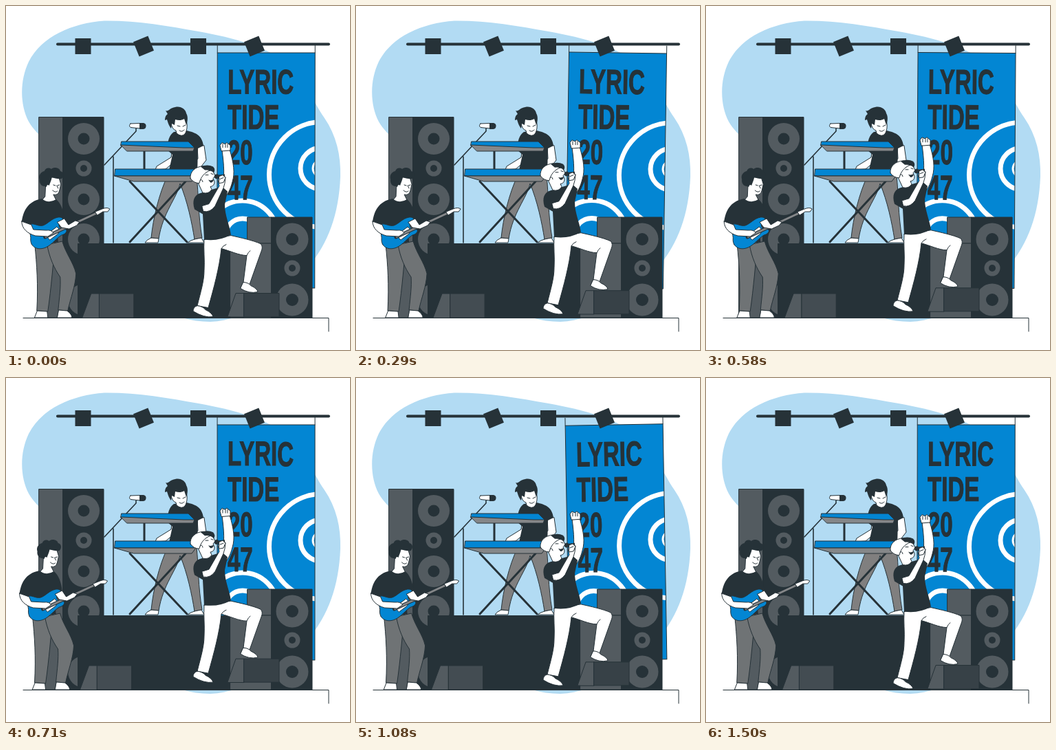
An HTML page that plays this animation: 500 by 500 pixels, repeating every 1.54 s.

```html
<!DOCTYPE html>
<html lang="en">
<head>
<meta charset="utf-8">
<title>Stage</title>
<style>
  html, body { margin: 0; width: 100%; height: 100%; overflow: hidden; background: #fff; }
  svg { display: block; width: 100vw; height: 100vh; }
  .dark { fill: #263238; }
  .blue { fill: #0386d3; }
  .ink { stroke: #263238; stroke-width: 1; stroke-linejoin: round; stroke-linecap: round; }
  .skin { fill: #fff; }
  .line { fill: none; }
  .side { fill: #535b60; }
  .ring { fill: none; stroke: #fff; stroke-width: 7; }
  .title {
    font: bold 50px "Liberation Sans", Arial, sans-serif;
    fill: #263238; stroke: #263238; stroke-width: 1;
    vector-effect: non-scaling-stroke;
  }
  #banner { transform-origin: 378px 238px; }
</style>
</head>
<body>
<svg viewBox="0 0 500 500">
  <defs>
    <clipPath id="cloth"><path d="M307 68H449V410H307Z"/></clipPath>
  </defs>

  <path fill="#b2dbf3" d="M143 21.500C190 21 235 29 280 37C330 46 385 60 413 88C434 108 446 138 463 163C480 188 487 217 486 248C484 302 468 346 440 378C404 417 352 457 297 459C239 459 195 425 156 380C124 340 107 278 88 232C75 206 45 190 33 168C20 143 20 108 33 81C52 44 96 25 143 21.500Z"/>

  <g id="banner">
    <path class="ink line" d="M307 57V68M449 57V68"/>
    <path class="blue" d="M307 68H449V410H307Z"/>
    <g clip-path="url(#cloth)" class="ring">
      <circle cx="459" cy="245" r="76.500"/>
      <circle cx="458" cy="236" r="30"/>
      <circle cx="458" cy="236" r="12" stroke-width="3"/>
      <circle cx="344" cy="334" r="51"/>
      <circle cx="344" cy="334" r="25"/>
    </g>
    <path class="ink line" d="M307 68H449V410H307Z"/>
    <g id="poster" transform="translate(322 0) scale(.66 1)"></g>
  </g>

  <path d="M75 55.5H469" stroke="#263238" stroke-width="4" stroke-linecap="round"/>
  <g id="lamps" class="dark"></g>

  <g id="leftStack">
    <path class="side ink" d="M48 161.500H83V453H48Z"/>
    <path class="dark ink" d="M83 161.500H142V453H83Z"/>
  </g>
  <g id="rightStack">
    <path class="side ink" d="M351 307H386V345H351Z"/>
    <path class="side ink" d="M326 345H386V453H326Z"/>
    <path class="dark ink" d="M386 307H445V453H386Z"/>
  </g>

  <g id="keys">
    <path class="ink line" style="stroke-width:1.6" d="M156 219V344M143 231L189 182V178"/>
    <path class="skin ink" d="M181 171L195 170.500V178L181 176.500Q178 174 181 171Z"/>
    <path class="dark" d="M194 170H200Q204 171 203.500 175Q203 179 199 179H194Z"/>
    <path fill="#807f7f" class="ink" d="M235 246L277 246C280 275 279 302 285 337L274 339C270 314 264 285 253 258C248 280 228 300 222 338L211 337C214 308 222 274 235 246Z"/>
    <path class="skin ink" d="M211 337L222 338L221 344H202Q204 340 211 337Z"/>
    <path class="skin ink" d="M274 339L284 337L288 344H264Q267 341 274 339Z"/>
    <path class="skin ink" d="M242 207L240 220L219 233L217 238L232 237L249 223Z"/>
    <path class="skin ink" d="M278 204L279 222L267 231L269 238H280L291 224L288 203Z"/>
    <path class="dark" d="M244 183L262 181C276 184 285 188 287 203L279 207L278 246L236 243L242 216L234 209C235 196 237 188 244 183Z"/>
    <path class="skin ink" d="M242 163L261 162C264 171 264 180 260 186Q255 191 248 185L247 181Q241 179 240 170Z"/>
    <path class="dark" d="M232 152C236 154 238 148 246 147C254 145 261 150 262 156C265 161 264 168 262 173L259 164C254 167 250 166 246 165L245 173L241 171L240 178C236 173 235 168 234 165L231 166C231 161 233 158 235 157Z"/>
    <path class="ink line" d="M249 174L253 175M257 175L261 173M252 181Q256 184 259 180"/>
    <path class="ink line" style="stroke-width:3" d="M180 255L263 343M261 255L180 343M201 211V237M246 211V237"/>
    <path class="blue ink" d="M168 197H265L274 206L272 211L167 203Z"/>
    <path fill="#858789" class="ink" d="M167 202L258 206L274 206L272 211H176Z"/>
    <path class="blue ink" d="M159 237H275L278 247H158Z"/>
    <path fill="#858789" class="ink" d="M158 247H276L270 255H186Z"/>
  </g>

  <path class="dark" d="M104 345H326V453H104Z"/>
  <path class="ink line" d="M25 453.500H469V473"/>

  <g id="left">
    <path class="side ink" d="M111 453L124 418H136V453Z"/>
    <path fill="#434c52" class="ink" d="M136 418H186V453H136Z"/>
    <path class="ink" fill="#6f7375" d="M42 347L72 343C69 370 66 410 61 444L45 443C47 405 45 375 42 347Z"/>
    <path class="ink" fill="#6f7375" d="M60 347L82 342C87 360 98 372 102 389C101 408 94 424 90 443L76 442C78 422 80 408 79 394C70 381 63 365 60 347Z"/>
    <path class="skin ink" d="M46 443L60 444L61 453H42Z"/>
    <path class="skin ink" d="M77 442L89 443Q96 448 96 453H75Z"/>
    <path class="skin ink" d="M58 257L57 277L51 284Q62 290 73 282L69 274Q76 276 78 268L80 259L77 249H62Z"/>
    <path class="dark" d="M49 252C47 246 51 241 56 240C57 236 62 234 66 237C71 233 79 236 79 240C84 241 85 247 81 251C76 252 70 250 67 249C66 254 64 257 63 261Q60 258 59 263L56 262C52 262 48 258 49 252Z"/>
    <path class="ink line" d="M69 260L72 261M75 261L78 260M68 268Q72 272 75 269M74 261L76 265"/>
    <path class="dark" d="M52 280Q62 288 73 281C80 286 84 298 85 309L74 314L76 343L37 347L39 319L23 314C25 299 31 284 52 280Z"/>
    <path class="blue ink" d="M35 318C40 314 46 321 54 319C62 316 66 309 76 307C84 306 85 312 79 315C75 319 78 325 84 324C91 324 89 331 81 333C74 337 67 347 58 351C46 356 36 350 36 340C37 331 31 324 35 318Z"/>
    <path class="skin ink" d="M62 330L74 321Q80 325 76 331L64 340Q58 336 62 330Z"/>
    <path class="ink line" style="stroke-width:5" d="M57 336L132 301"/>
    <path fill="none" stroke="#858789" stroke-width="3" d="M57 336L132 301"/>
    <path class="skin ink" d="M130 299L140 295Q147 292 151 295L148 299L141 299L133 304Z"/>
    <path class="skin ink" d="M23 313L37 318L40 325L58 326Q67 325 69 330L61 335L43 334C32 331 23 324 23 313Z"/>
    <path class="skin ink" d="M75 314L85 309L91 318L101 312L107 314L103 319L92 324L81 322Z"/>
  </g>

  <g id="right">
    <path class="side ink" d="M322 452L334 418H346V452Z"/>
    <path fill="#374147" class="ink" d="M346 418H397V452H346Z"/>
    <path class="skin ink" d="M288 340L327 334C340 337 359 341 370 346Q374 350 371 357L354 405L345 402L350 363C339 363 325 356 313 353C310 382 302 410 294 439L278 436C283 416 288 400 288 385C289 369 287 354 288 340Z"/>
    <path class="ink line" d="M313 353Q315 349 320 347M350 363Q352 358 355 356"/>
    <path class="skin ink" d="M278 436Q286 437 290 442Q299 446 301 452Q288 454 272 444Q272 438 278 436Z"/>
    <path class="skin ink" d="M345 402Q352 402 356 407Q365 411 366 416Q353 419 341 411Z"/>
    <path class="skin ink" d="M304 270L314 263C318 249 317 232 314 210L325 209C331 229 333 243 329 256C326 268 322 275 315 282Z"/>
    <path class="skin ink" d="M313 211L311 203L314 199L318 201L321 199L326 203V210Z"/>
    <path class="ink line" d="M315 201V206M319 201V206M322 201V206"/>
    <path class="dark" d="M281 273L297 268L314 263L322 270L318 289C318 305 325 319 327 333Q309 343 288 340L286 303L274 296C270 283 274 276 281 273Z"/>
    <path class="skin ink" d="M279 257L286 272Q295 274 299 267L297 263Q303 262 303 256L301 251L304 247L300 239L286 241Z"/>
    <path class="skin ink" d="M268 251C267 241 275 234 287 233L297 239C288 243 283 249 281 258Q273 258 268 251Z"/>
    <path class="dark" d="M283 234Q293 230 301 234Q305 238 302 243Q297 238 289 239Z"/>
    <path class="dark" d="M294 253Q298 255 302 252Q301 258 297 257Z"/>
    <path class="ink line" d="M290 246L294 246M298 244L301 245M282 254Q285 251 286 256"/>
    <path class="skin ink" d="M285 291L295 288L310 262L308 253L313 248L319 249L318 258L316 265L304 291Q297 301 287 299Z"/>
    <path class="dark" d="M303 247Q306 243 309 246L318 245V250L309 251Q305 253 303 250Z"/>
    <path class="skin ink" d="M310 248L315 246L319 250L316 257L310 258Z"/>
    <path class="ink line" d="M311 252L316 250"/>
  </g>
</svg>

<script>
const NS = "http://www.w3.org/2000/svg";
const FPS = 24, FRAMES = 37, LOOP = 1540;
const CYCLE = 36, LEAD = 0.75; // in frames
const byId = id => document.getElementById(id);

function add(parent, tag, attrs, text = "") {
  const el = document.createElementNS(NS, tag);
  for (const key in attrs) el.setAttribute(key, attrs[key]);
  el.textContent = text;
  byId(parent).append(el);
}

function cones(parent, x, list) {
  for (const [y, r, hole] of list) {
    add(parent, "circle", { cx: x, cy: y, r, fill: "#535b60" });
    add(parent, "circle", { cx: x, cy: y, r: hole, fill: "#263238" });
  }
}

["LYRIC", "TIDE", "20", "47"].forEach((word, i) =>
  add("poster", "text", { class: "title", x: 0, y: 127.5 + i * 51.3 }, word));

[[112, 0], [200, -22], [279.5, 0], [361, -22]].forEach(([x, turn]) =>
  add("lamps", "rect", { x: x - 11.5, y: 47, width: 23, height: 23,
    transform: `rotate(${turn} ${x} 58.5)` }));

cones("leftStack", 113, [[193, 23, 8.5], [236, 11.5, 5], [281, 23, 8.5], [339, 23, 8.5], [427, 23, 8.5]]);
cones("rightStack", 416, [[339, 23.5, 9], [381, 11.5, 5], [427, 23.5, 9]]);

// Evenly spaced poses over one cycle, joined linearly
const wind = [0, 1, 0, -1, 0];
const shake = [0, -1, 2, -4, 4, -4, 4, -4, 2, -1, 0];
const float = [0, -10, 0];

function pose(values, phase) {
  const at = phase * (values.length - 1), i = Math.floor(at);
  return values[i] + (values[i + 1] - values[i]) * (at - i);
}

function draw(now) {
  // Steps fall on hundredths of a second, hence the 5 ms rounding
  const frame = Math.floor((now % LOOP + 5) * FPS / 1000) % FRAMES;
  const phase = (frame + LEAD) / CYCLE % 1;
  byId("banner").style.transform = `rotate(${pose(wind, phase)}deg)`;
  byId("left").style.transform = `translate(${pose(shake, phase)}px, 0px)`;
  byId("right").style.transform = `translate(0px, ${pose(float, phase)}px)`;
}

const start = performance.now();
function tick() {
  draw(performance.now() - start);
  requestAnimationFrame(tick);
}
tick();
</script>
</body>
</html>
```
